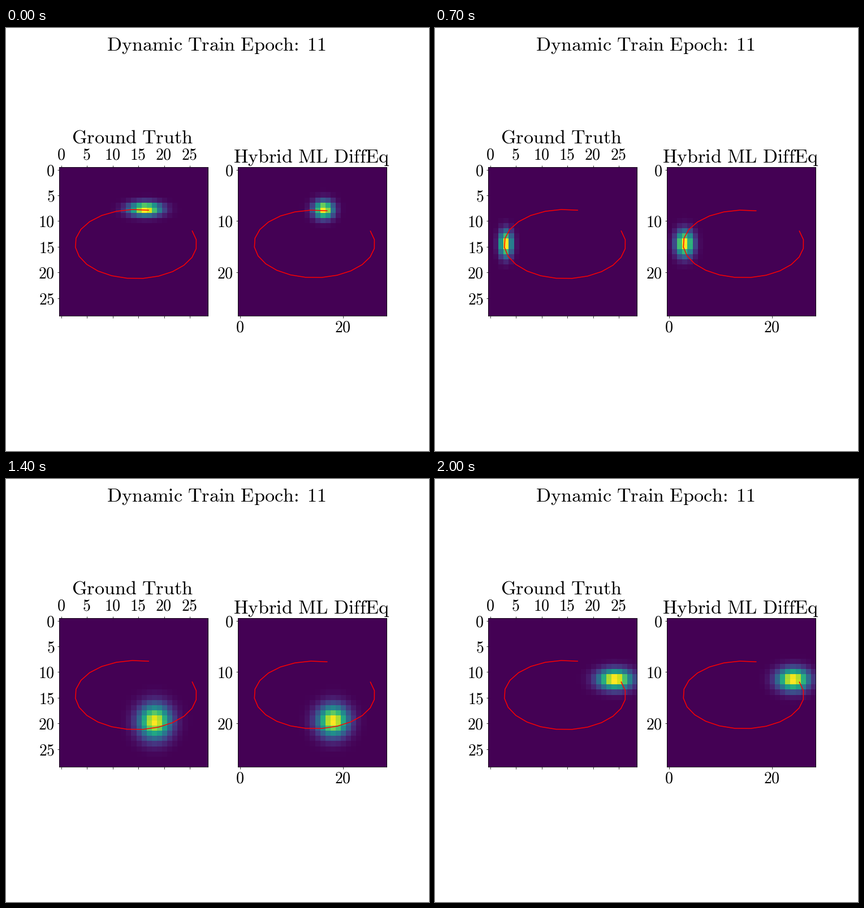
These frames come from a looping animation (748 px wide and 748 px high, 2.1 s). A matplotlib script:

```python
import numpy as np
import matplotlib.pyplot as plt
from matplotlib.animation import FuncAnimation

SIZE, DPI = 748, 100
PX = 72 / DPI  # points per pixel
CELLS, FRAMES = 29, 21
TITLE, TICK = 34.2 * PX, 28 * PX

plt.rcParams.update({
    "mathtext.fontset": "cm",
    "axes.linewidth": 0.8 * PX,
    "xtick.major.size": 3.5 * PX, "xtick.major.width": 0.8 * PX,
    "ytick.major.size": 3.5 * PX, "ytick.major.width": 0.8 * PX,
})

grid = np.arange(CELLS)
step = np.arange(FRAMES)
# Nearly uniform turn around the ellipse, slowing a little
theta = np.radians(78 + 15.45 * step - 0.012 * step ** 2)


def tex(s):
    words = r"\ ".join(r"\text{%s}" % w for w in s.split())
    return "$" + words.replace(":}", r":}\,") + "$"


def label(x, y, s, size=TICK, ha="center"):
    fig.text(x / SIZE, 1 - y / SIZE, tex(s), fontsize=size, ha=ha,
             va="baseline", color="black")


def soft_switch(phase, bias):
    """Smooth -1..1 swing that lingers at both ends."""
    return np.tanh(2.5 * (np.cos(theta - np.radians(phase)) - bias))


def bell(center, width):
    return np.exp(-((grid - center) / width) ** 2 / 2)


class Panel:
    def __init__(self, ax, center, radius, sx, sy):
        self.x = center[0] + radius[0] * np.cos(theta)
        self.y = center[1] - radius[1] * np.sin(theta)
        self.sx, self.sy = sx, sy
        self.image = ax.imshow(self.field(0), cmap="viridis",
                               interpolation="nearest")
        ax.plot(self.x, self.y, color="red", lw=1.5 * PX)
        ax.set_xlim(-0.5, CELLS - 0.5)
        ax.set_ylim(CELLS - 0.5, -0.5)

    def field(self, k):
        # The drawn path is a slightly enlarged copy of the blob's track
        cx, cy = (self.x[k] + 0.4) / 1.07, (self.y[k] + 0.4) / 1.07
        return np.outer(bell(cy, self.sy[k]), bell(cx, self.sx[k]))

    def update(self, k):
        data = self.field(k)
        self.image.set_data(data)
        self.image.set_clim(data.min(), data.max())
        return self.image


fig, (left, right) = plt.subplots(1, 2, figsize=(SIZE / DPI, SIZE / DPI),
                                  dpi=DPI, facecolor="white")
panels = [
    Panel(left, (14.5, 14.47), (11.83, 6.73),
          sx=1.52 - 0.72 * soft_switch(184, 0.15),
          sy=1.57 - 0.7 * np.sin(theta)),
    Panel(right, (14.45, 14.44), (11.75, 6.58),
          sx=1.63 - 0.5 * soft_switch(160, -0.2),
          sy=1.6 - 0.45 * np.sin(theta)),
]

fives, tens, twenties = range(0, 26, 5), range(0, 21, 10), range(0, 21, 20)
left.set_xticks(fives)
left.set_yticks(fives)
right.set_xticks(twenties)
right.set_yticks(tens)
for ax in (left, right):
    ax.tick_params(labelleft=False, labelbottom=False)
left.tick_params(top=True)


def at(start, value):
    return start + (value + 0.5) * 9.086


label(372.5, 39.5, "Dynamic Train Epoch: 11", TITLE)
label(223.5, 203.5, "Ground Truth", TITLE)
label(540.5, 238.5, "Hybrid ML DiffEq", TITLE)
for v in fives:
    label(at(93.5, v) - 0.8, 232.5, str(v))
    label(86, at(246, v) + 10.5, str(v), ha="right")
for v in tens:
    label(402, at(246, v) + 10.5, str(v), ha="right")
for v in twenties:
    label(at(410, v) - 1, 538, str(v))


def draw(k):
    return [p.update(k) for p in panels]


anim = FuncAnimation(fig, draw, frames=FRAMES, interval=100,
                     repeat=True, repeat_delay=0, blit=False)
plt.show()
```
